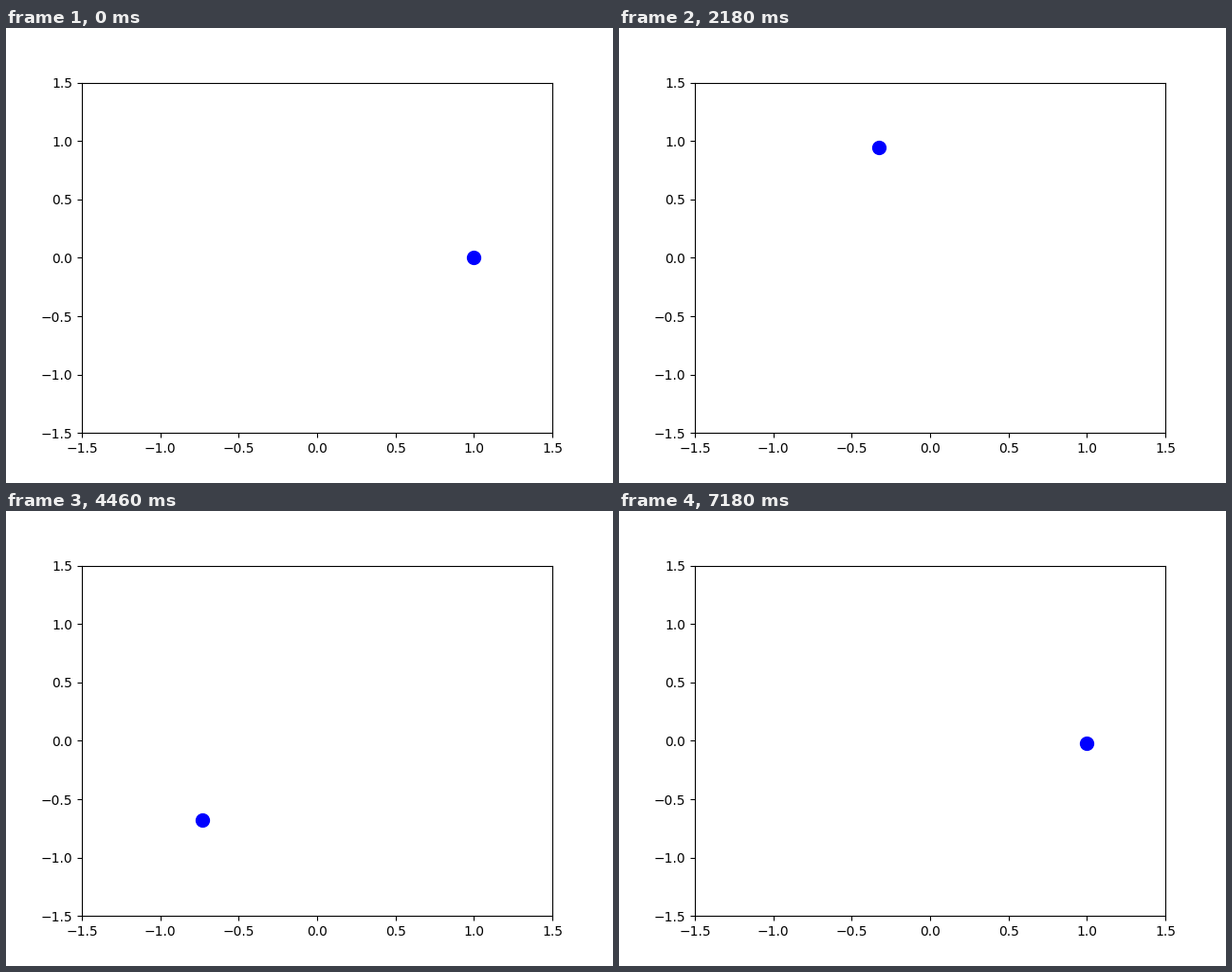
Animation of 640x480 px, one loop 7200 ms. Source, as a matplotlib script:

```python
import numpy as np
import matplotlib.pyplot as plt
from matplotlib.animation import FuncAnimation

FRAMES = 360
INTERVAL = 20  # ms

fig, ax = plt.subplots(figsize=(6.4, 4.8), dpi=100)
ax.set_xlim(-1.5, 1.5)
ax.set_ylim(-1.5, 1.5)
ball, = ax.plot([], [], "bo", markersize=10)


def update(frame):
    """Place the ball on the unit circle, one degree per frame."""
    angle = np.radians(frame)
    ball.set_data([np.cos(angle)], [np.sin(angle)])
    return ball,


anim = FuncAnimation(fig, update, frames=FRAMES, interval=INTERVAL,
                     blit=True, repeat=True, repeat_delay=0)
plt.show()
```
